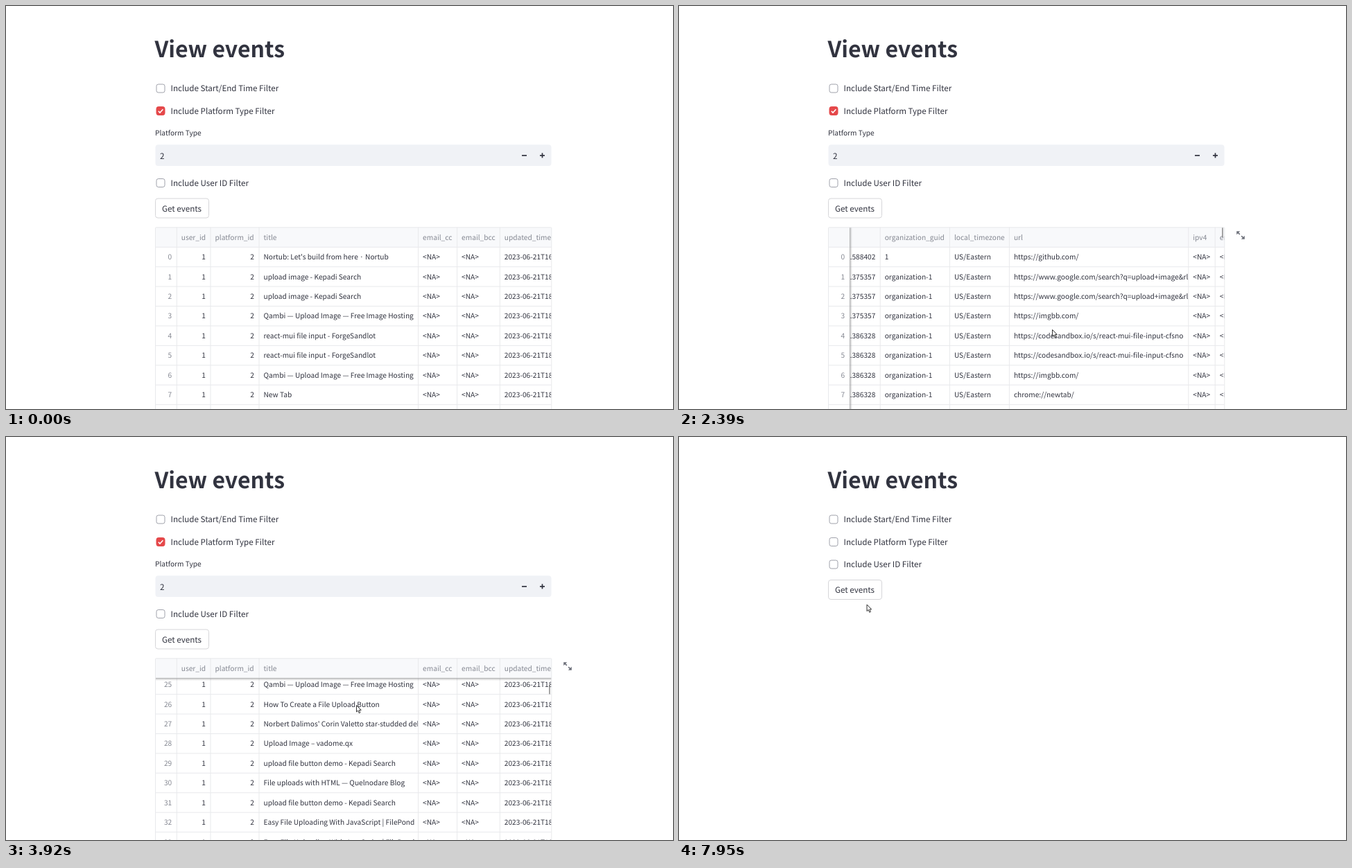
Recreate the animation shown at these times as an HTML page with a canvas. Size 962 by 582 pixels, loop 8000 ms.

```html
<!DOCTYPE html>
<html lang="en">
<head>
<meta charset="utf-8">
<title>View events</title>
<style>
  html, body { margin: 0; width: 100%; height: 100%; overflow: hidden; background: #fff; }
  canvas { display: block; }
</style>
</head>
<body>
<canvas id="stage" width="962" height="582"></canvas>
<script>
const ctx = document.getElementById('stage').getContext('2d');
const LOOP = 8000;
const FAMILY = '"Noto Sans CJK JP", "Noto Sans CJK SC", "Noto Sans CJK", "Noto Sans", sans-serif';
const INK = '#31333f', MUTED = '#858892', LINE = '#e8e9ec';
const BODY = 11.63, SMALL = 10.18;
const TABLE = { left: 215.5, top: 319.8, right: 786.8, frozen: 246.3, row: 28.43 };
const HEADER_BOTTOM = TABLE.top + TABLE.row;

const TITLES = {
  G: "Nortub: Let's build from here · Nortub",
  S: 'upload image - Kepadi Search',
  I: 'Qambi — Upload Image — Free Image Hosting',
  R: 'react-mui file input - ForgeSandlot',
  N: 'New Tab',
  D: 'upload file button demo - Kepadi Search',
  H: 'How To Create a File Upload Button',
  U: 'Upload Image – vadome.qx',
  P: "Norbert Dalimos' Corin Valetto star-studded debut",
  F: 'File uploads with HTML — Quelnodare Blog',
  E: 'Easy File Uploading With JavaScript | FilePond',
  A: "Stable Diffusion's next-gen image AI"
};
const URLS = {
  G: 'https://github.com/',
  S: 'https://www.google.com/search?q=upload+image&rlz=1C1',
  I: 'https://imgbb.com/',
  R: 'https://codesandbox.io/s/react-mui-file-input-cfsno',
  N: 'chrome://newtab/'
};
const ORDER = 'GSSIRRINIDHHUHDIUDHIUDDHIIHPUDFDEE';

const NA = () => '<NA>';
const COLUMNS = [
  { name: 'user_id', width: 48.7, value: () => '1', right: true },
  { name: 'platform_id', width: 70, value: () => '2', right: true },
  { name: 'title', width: 229.6, value: r => TITLES[r.key] },
  { name: 'email_cc', width: 56, value: NA },
  { name: 'email_bcc', width: 61.7, value: NA },
  { name: 'updated_time', width: 147.9, value: r => r.time },
  { name: 'organization_guid', width: 100.2, value: r => r.id ? 'organization-1' : '1' },
  { name: 'local_timezone', width: 86, value: () => 'US/Eastern' },
  { name: 'url', width: 258.4, value: r => URLS[r.key] || 'https://imgbb.com/' },
  { name: 'ipv4', width: 38.4, value: NA },
  { name: 'end_time', width: 70, value: NA }
];

// Keyframes are [time, ...values]; each segment is eased.
const smooth = u => u * u * (3 - 2 * u);
function track(keys, t) {
  if (t <= keys[0][0]) return keys[0].slice(1);
  for (let i = 1; i < keys.length; i++) {
    const a = keys[i - 1], b = keys[i];
    if (t < b[0]) {
      const u = smooth((t - a[0]) / (b[0] - a[0]));
      return a.slice(1).map((v, k) => v + (b[k + 1] - v) * u);
    }
  }
  return keys[keys.length - 1].slice(1);
}
const fade = (t, from, to) => Math.min(1, Math.max(0, (t - from) / (to - from)));

const POINTER = [
  [270, 867, 557], [590, 372, 297], [750, 372, 297], [980, 274, 187], [1320, 538, 467],
  [3850, 538, 467], [3920, 505, 387], [4320, 487, 343], [5430, 487, 343], [5500, 432, 300],
  [5920, 327, 224], [6010, 327, 224], [6200, 324, 216], [6540, 324, 216], [7200, 284, 142],
  [7350, 284, 144], [7450, 284, 144], [7950, 270.5, 241.5]
];
const SCROLL_X = [[1540, 0], [1920, 546], [2390, 570], [2420, 570], [2640, 0]];
const SCROLL_Y = [[2980, 0], [3040, 135.7], [3630, 715.8]];

function text(str, x, cy, size = SMALL, color = INK, align = 'left', weight = 400) {
  ctx.font = `${weight} ${size}px ${FAMILY}`;
  ctx.textAlign = align;
  ctx.fillStyle = color;
  ctx.fillText(str, x, cy + size * 0.365);
}
function box(x, y, w, h, r, fill, stroke) {
  ctx.beginPath();
  ctx.roundRect(x, y, w, h, r);
  if (fill) { ctx.fillStyle = fill; ctx.fill(); }
  if (stroke) { ctx.strokeStyle = stroke; ctx.lineWidth = 1; ctx.stroke(); }
}
function rect(x, y, w, h, color) {
  ctx.fillStyle = color;
  ctx.fillRect(x, y, w, h);
}
function stroke(points, color, width) {
  ctx.beginPath();
  points.forEach(([x, y]) => ctx.lineTo(x, y));
  ctx.strokeStyle = color;
  ctx.lineWidth = width;
  ctx.stroke();
}
function clipped(x, y, w, h, draw) {
  ctx.save();
  ctx.beginPath();
  ctx.rect(x, y, w, h);
  ctx.clip();
  draw();
  ctx.restore();
}

function checkbox(label, cy, checked) {
  box(217, cy - 6, 12, 12, 2.8, checked ? '#e5484a' : '#fff', checked ? '#e5484a' : '#9fa1aa');
  if (checked) stroke([[219.8, cy + 0.2], [222, cy + 2.5], [226.4, cy - 2.2]], '#fff', 1.6);
  text(label, 237.5, cy, BODY);
}

function form(checked, collapsed) {
  const shift = collapsed ? -71.5 : 0;
  text('View events', 214.5, 62.6, 32, INK, 'left', 700);
  checkbox('Include Start/End Time Filter', 119, false);
  checkbox('Include Platform Type Filter', 151.5, checked);
  if (!collapsed) {
    text('Platform Type', 215, 183.3);
    box(215.5, 200.3, 571, 30.8, 4, '#f0f2f6');
    text('2', 222, 216.3, BODY);
    rect(744, 215, 7, 1.7, INK);
    rect(770, 215, 7, 1.7, INK);
    rect(772.65, 212.3, 1.7, 7, INK);
  }
  checkbox('Include User ID Filter', 255.5 + shift, false);
  box(215.5, 278 + shift, 77, 28, 3.5, '#fff', '#d6d6d9');
  text('Get events', 225, 292.5 + shift, BODY);
}

function rowAt(r, sort) {
  if (sort === 'desc') return { id: 195 - r, key: 'A', time: '2023-06-23T18:20:02.401126' };
  if (sort === 'asc') return { id: 10 + r + (r % 3) * 4, key: r < 31 ? 'H' : 'I', time: '2023-06-22T18:05:02.386328' };
  const time = r === 0 ? '16:09:30.588402' : r < 4 ? '18:02:02.375357' : '18:05:02.386328';
  return { id: r, key: ORDER[r % ORDER.length], time: '2023-06-21T' + time };
}

function pictureEmoji(x, cy) {
  rect(x, cy - 5, 11, 10, '#b9793a');
  rect(x + 1.3, cy - 3.7, 8.4, 7.4, '#8fc9e8');
  rect(x + 1.3, cy + 0.8, 8.4, 2.9, '#5d9144');
  rect(x + 6.5, cy - 2.6, 2, 2, '#f4d35e');
}

function cell(column, row, x, cy) {
  if (column.right) return text(column.value(row), x + column.width - 7, cy, SMALL, INK, 'right');
  text(column.value(row), x + 6.5, cy);
  if (column.name === 'title' && row.key === 'A') {
    const end = x + 6.5 + ctx.measureText(TITLES.A).width;
    text(', Marn & more', end + 18, cy);
    pictureEmoji(end + 4.5, cy);
  }
}

function sortArrow(x, cy, sort) {
  const d = sort === 'desc' ? 1 : -1;
  stroke([[x, cy - 3.6], [x, cy + 3.6]], MUTED, 1);
  stroke([[x - 2.6, cy + d], [x, cy + d * 3.6], [x + 2.6, cy + d]], MUTED, 1);
}

function shadow(x, y, w, h, dx, dy) {
  const g = ctx.createLinearGradient(x, y, x + dx, y + dy);
  g.addColorStop(0, 'rgba(0,0,0,.26)');
  g.addColorStop(1, 'rgba(0,0,0,0)');
  rect(x, y, w, h, g);
}

function table(scrollX, scrollY, sort) {
  const { left, top, right, frozen, row } = TABLE;
  const headerY = top + row / 2;
  const first = Math.floor(scrollY / row);
  const rowTop = r => HEADER_BOTTOM + r * row - scrollY;

  clipped(left, HEADER_BOTTOM, right - left, 582, () => {
    for (let r = first; rowTop(r) < 582; r++) {
      const cy = rowTop(r) + row / 2;
      text(String(rowAt(r, sort).id), 239.2, cy, SMALL, MUTED, 'right');
      rect(left, rowTop(r) + row - 0.5, right - left, 1, LINE);
    }
  });
  rect(left, top, right - left, row, '#f8f9fb');

  let x = frozen - scrollX;
  for (const column of COLUMNS) {
    const from = Math.max(x, frozen), to = Math.min(x + column.width, right);
    if (to > from) {
      clipped(from, top, to - from, row, () => {
        const sorted = sort && column.name === 'title';
        if (sorted) sortArrow(x + 9.4, headerY, sort);
        text(column.name, x + (sorted ? 15.2 : 6.5), headerY, SMALL, MUTED);
      });
      clipped(from, HEADER_BOTTOM, to - from, 582, () => {
        for (let r = first; rowTop(r) < 582; r++) cell(column, rowAt(r, sort), x, rowTop(r) + row / 2);
      });
      if (to < right) rect(to - 0.5, top, 1, 582, LINE);
    }
    x += column.width;
  }

  rect(frozen - 0.5, top, 1, 582, LINE);
  rect(left, HEADER_BOTTOM - 0.5, right - left, 1, LINE);
  if (scrollX > 0) shadow(frozen - 0.3, top, 4, 582, 4, 0);
  if (scrollY > 0) shadow(left, HEADER_BOTTOM - 0.3, right - left, 4, 0, 4);
  box(left, top, right - left, 300, 1, null, LINE);
}

function expandIcon(alpha) {
  if (alpha <= 0) return;
  ctx.save();
  ctx.globalAlpha = alpha;
  ctx.translate(810, 331);
  for (const s of [-1, 1]) {
    stroke([[s * 1.2, s * 1.2], [s * 4, s * 4]], '#6d707a', 1.7);
    ctx.beginPath();
    for (const [x, y] of [[5.8, 5.8], [5.8, 0.8], [0.8, 5.8]]) ctx.lineTo(s * x, s * y);
    ctx.fillStyle = '#6d707a';
    ctx.fill();
  }
  ctx.restore();
}

function outlined(path, width = 1) {
  ctx.fillStyle = '#fff';
  ctx.fill(path);
  ctx.strokeStyle = '#333';
  ctx.lineWidth = width;
  ctx.stroke(path);
}
const ARROW = new Path2D('M.5 .5V10L2.7 8L4.2 11.7L5.9 11L4.4 7.4H7.2Z');
const HAND = new Path2D('M-1 9L-3.6 6.4Q-4.5 5.4-3.5 5T-1.2 6.8V1Q-1 0 0 0T1.2 1V5L5.4 5.8Q7 6.2 7 7.5L6 11.5V14H-.5V12Z');

function pointer(t, collapsed) {
  if (t < 310) return;
  const [x, y] = track(POINTER, t);
  const onHeader = t > 4000 && t < 5540 && y < HEADER_BOTTOM;
  const onLabel = t > 6540 && y < 160 && y > 138;
  const onInput = !collapsed && y > 200 && y < 231;
  ctx.save();
  ctx.translate(x, y);
  if (onHeader || onLabel) outlined(HAND);
  else if (onInput) {
    rect(-0.5, -5, 1, 10, '#333');
    rect(-2.5, -5, 5, 1, '#333');
    rect(-2.5, 4, 5, 1, '#333');
  } else outlined(ARROW);
  ctx.restore();
}

function render(now) {
  const t = now % LOOP;
  const collapsed = t >= 7530;
  const [scrollX] = track(SCROLL_X, t), [scrollY] = track(SCROLL_Y, t);
  const sort = t < 4510 ? '' : t < 4970 ? 'asc' : 'desc';

  ctx.textRendering = 'geometricPrecision';
  rect(0, 0, 962, 582, '#fff');
  form(t < 7410, collapsed);
  if (!collapsed) {
    table(scrollX, scrollY, sort);
    expandIcon(fade(t, 1150, 1320) - fade(t, 5600, 5900));
    ctx.globalAlpha = fade(t, 1150, 1320) - fade(t, 6800, 7000);
    rect(783.3, 320.3 + scrollY * 0.0525, 1.3, 13.5, '#777');
    ctx.globalAlpha = 1;
  }
  pointer(t, collapsed);
  requestAnimationFrame(next);
}
const start = performance.now();
const next = () => render(performance.now() - start);
next();
</script>
</body>
</html>
```
